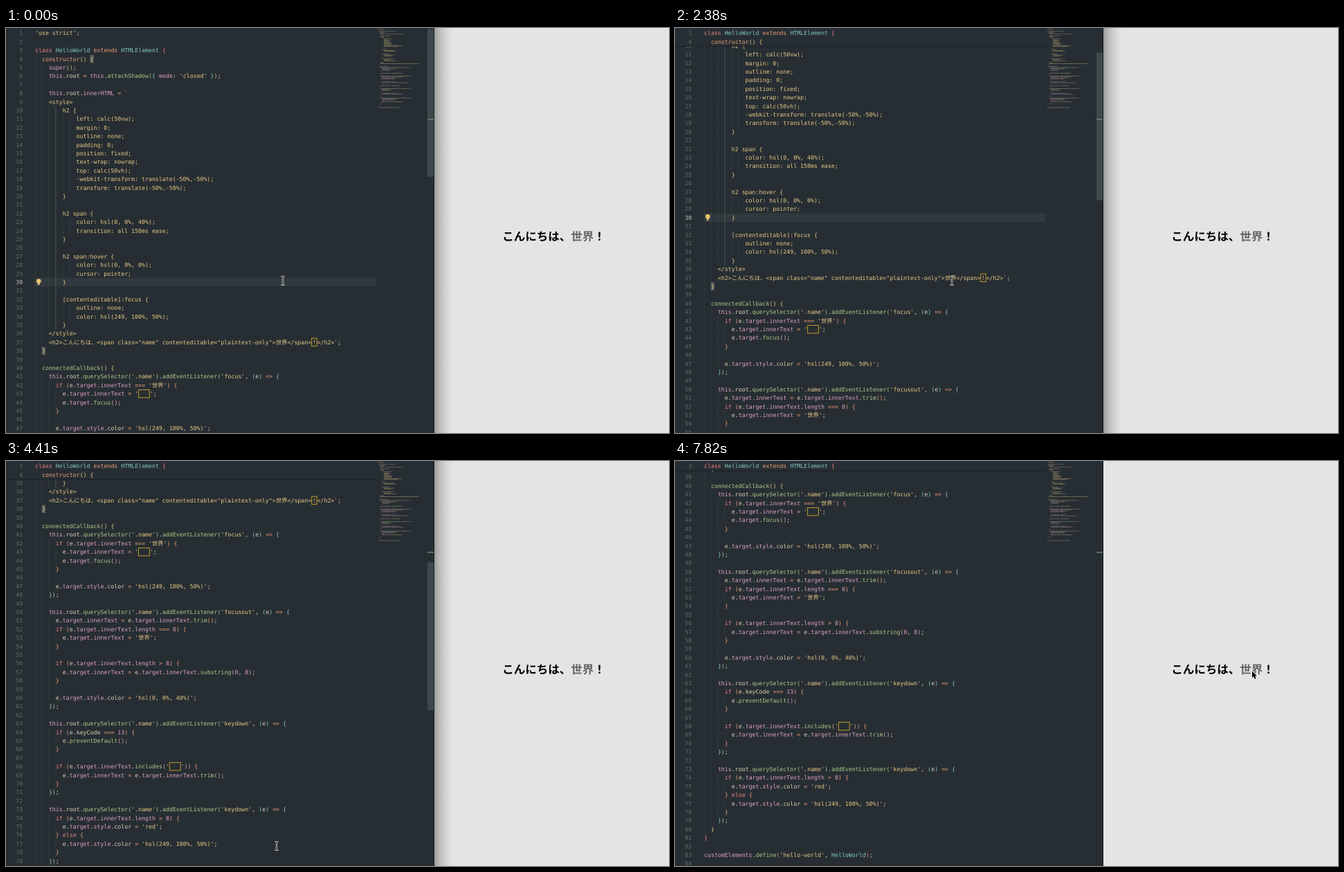
Write an HTML page with a canvas that moves like this. It is 958 px wide and 585 px high and loops after 8000 ms.

```html
<!DOCTYPE html>
<html lang="ja">
<head>
<meta charset="utf-8">
<style>
html, body { margin: 0; width: 100%; height: 100%; overflow: hidden; background: #e4e4e4; }
canvas { display: block; }
</style>
</head>
<body>
<canvas id="stage" width="958" height="585"></canvas>
<script id="code" type="text/plain">'use strict';

class HelloWorld extends HTMLElement {
  constructor() {
    super();
    this.root = this.attachShadow({ mode: 'closed' });

    this.root.innerHTML = `
    <style>
        h2 {
            left: calc(50vw);
            margin: 0;
            outline: none;
            padding: 0;
            position: fixed;
            text-wrap: nowrap;
            top: calc(50vh);
            -webkit-transform: translate(-50%,-50%);
            transform: translate(-50%,-50%);
        }

        h2 span {
            color: hsl(0, 0%, 40%);
            transition: all 150ms ease;
        }

        h2 span:hover {
            color: hsl(0, 0%, 0%);
            cursor: pointer;
        }

        [contenteditable]:focus {
            outline: none;
            color: hsl(249, 100%, 50%);
        }
    </style>
    <h2>こんにちは、<span class="name" contenteditable="plaintext-only">世界</span>！</h2>`;
  }

  connectedCallback() {
    this.root.querySelector('.name').addEventListener('focus', (e) => {
      if (e.target.innerText === '世界') {
        e.target.innerText = '  ';
        e.target.focus();
      }

      e.target.style.color = 'hsl(249, 100%, 50%)';
    });

    this.root.querySelector('.name').addEventListener('focusout', (e) => {
      e.target.innerText = e.target.innerText.trim();
      if (e.target.innerText.length === 0) {
        e.target.innerText = '世界';
      }

      if (e.target.innerText.length > 8) {
        e.target.innerText = e.target.innerText.substring(0, 8);
      }

      e.target.style.color = 'hsl(0, 0%, 40%)';
    });

    this.root.querySelector('.name').addEventListener('keydown', (e) => {
      if (e.keyCode === 13) {
        e.preventDefault();
      }

      if (e.target.innerText.includes('  ')) {
        e.target.innerText = e.target.innerText.trim();
      }
    });

    this.root.querySelector('.name').addEventListener('keydown', (e) => {
      if (e.target.innerText.length > 8) {
        e.target.style.color = 'red';
      } else {
        e.target.style.color = 'hsl(249, 100%, 50%)';
      }
    });
  }
}

customElements.define('hello-world', HelloWorld);
</script>
<script>
const ctx = document.getElementById('stage').getContext('2d');
// put the ideographic spaces in, whatever the file's whitespace became
const source = document.getElementById('code').textContent.replace(/'\s\s'/g, "'\u3000\u3000'");

const LOOP = 8000, BLUR = 7760, W = 958, H = 585;
const TOP = 1.3, LEFT = 42, LINE = 12.4, CHAR = 4.973, WIDE = 8.26, EDGE = 619, TEXT_END = 535;
const BG = '#272e33', FG = '#dcd0b6', RED = '#ee8385', ORANGE = '#ee9d78', YELLOW = '#e6c886',
      GREEN = '#aeca88', BLUE = '#82cabf', PURPLE = '#dfa0be';
const BRACKETS = [RED, YELLOW, GREEN, BLUE, ORANGE, PURPLE];
const FONT = '8.26px "DejaVu Sans Mono", "Noto Sans CJK JP", monospace';
const WORDS = {};
const paint = (color, words) => words.split(' ').forEach(w => WORDS[w] = color);
paint(RED, 'class if else');
paint(ORANGE, 'extends constructor');
paint(BLUE, 'HelloWorld HTMLElement');
paint(PURPLE, 'this super mode target innerText innerHTML length style customElements');

// Split the code into coloured runs, line by line
const lines = source.split('\n').map(text => ({ text, runs: [], boxes: [] }));
let row = 0, x = 0, depth = 0;

function addRun(text, color) {
  for (const [part] of text.matchAll(/[\x20-\x7e]+|[^\x00-\x7f]+/g)) {
    const wide = part > '\x7f', w = part.length * (wide ? WIDE : CHAR);
    if (part.trim()) lines[row].runs.push({ part, x, w, color });
    if (/[\u3000！]/.test(part)) lines[row].boxes.push([x, w]);
    x += w;
  }
}

for (const m of source.matchAll(/`[^`]*`|'[^']*'|[A-Za-z]\w*|\d+|\s+|=>|===|./g)) {
  const s = m[0];
  let color = FG;
  if (/^[`']/.test(s)) color = YELLOW;
  else if (/^[({]$/.test(s)) color = BRACKETS[depth++ % 6];
  else if (/^[)}]$/.test(s)) color = BRACKETS[--depth % 6];
  else if (/^[=>]/.test(s)) color = ORANGE;
  else if (/^\d/.test(s)) color = PURPLE;
  else if (/^\w/.test(s)) color = WORDS[s] || (source[m.index + s.length] === '(' ? GREEN : FG);
  s.split('\n').forEach((part, i) => {
    if (i) { row++; x = 0; }
    addRun(part, color);
  });
}

// Indent levels; a blank line takes its level from its neighbours
const indent = l => l.text.search(/\S/) / 2;
lines.forEach((l, i) => {
  if (l.text.trim()) { l.level = indent(l); return; }
  const above = i ? lines[i - 1].level : 0;
  const next = lines.slice(i).find(n => n.text.trim());
  const below = next ? indent(next) : 0;
  l.level = above === below ? above : Math.min(above, below) + 1;
});

// Monotone cubic through [time, value] points
function curve(...pts) {
  const n = pts.length - 1;
  const d = pts.slice(1).map((p, i) => (p[1] - pts[i][1]) / (p[0] - pts[i][0]));
  const slope = pts.map((p, i) => i && i < n && d[i - 1] * d[i] > 0 ? 2 * d[i - 1] * d[i] / (d[i - 1] + d[i]) : 0);
  return t => {
    if (t <= pts[0][0]) return pts[0][1];
    if (t >= pts[n][0]) return pts[n][1];
    const i = pts.findIndex(p => p[0] > t) - 1, h = pts[i + 1][0] - pts[i][0], u = (t - pts[i][0]) / h, v = 1 - u;
    return v * v * ((1 + 2 * u) * pts[i][1] + u * h * slope[i]) +
           u * u * ((1 + 2 * v) * pts[i + 1][1] - v * h * slope[i + 1]);
  };
}
const scrollAt = curve([1350, 0], [1800, 37.2], [2380, 93], [3000, 170], [3240, 188.7],
                       [3900, 188.7], [4100, 240], [4410, 396.7], [4640, 453], [4880, 455.2]);
const mouseX = curve([3370, 400], [3710, 391], [6030, 391], [6080, 394.5], [6830, 873], [7070, 873], [7580, 833.5]);
const mouseY = curve([3370, 365], [3710, 556], [6080, 556], [6830, 343], [7070, 343], [7580, 303]);

function rect(color, x, y, w, h) {
  ctx.fillStyle = color;
  ctx.fillRect(x, y, w, h);
}

function drawText(i, y) {
  ctx.font = FONT;
  ctx.textAlign = 'right';
  ctx.fillStyle = i === 29 ? '#c3c9bf' : '#606a69';
  ctx.fillText(i + 1, 24.3, y + 9.1);
  ctx.textAlign = 'left';
  for (const r of lines[i].runs) {
    ctx.fillStyle = r.color;
    ctx.fillText(r.part, LEFT + r.x, y + 9.1);
  }
}

function drawLine(i, y, t) {
  const l = lines[i];
  if (i === 29) rect('#30393d', LEFT, y, TEXT_END - LEFT, LINE);
  for (let k = 0; k < l.level; k++) {
    const active = k === 3 && i > 8 && i < 35;
    rect(`rgba(140,155,148,${active ? 0.42 : 0.16})`, LEFT + k * 2 * CHAR - 0.3, y, 0.8, LINE);
  }
  if (t < BLUR && (i === 3 || i === 37)) {
    rect('#545c5d', LEFT + (i === 3 ? 16 : 2) * CHAR - 0.4, y + 0.4, CHAR + 0.6, LINE - 0.8);
  }
  drawText(i, y);
  ctx.strokeStyle = '#bd9b2c';
  ctx.lineWidth = 1;
  for (const [bx, w] of l.boxes) ctx.strokeRect(LEFT + bx + 0.4, y + 0.5, w - 0.8, LINE - 1);
  if (i === 29) {
    drawBulb(47.3, y + 4.6);
    if (t >= 560 && (t - 560) % 1010 < 490) rect('#dbd68c', 86.2, y, 1.3, LINE);
  }
}

function drawBulb(x, y) {
  ctx.fillStyle = '#e8c46c';
  ctx.beginPath();
  ctx.arc(x, y, 3.3, 0, 7);
  ctx.fill();
  rect('#e8c46c', x - 1.6, y + 2, 3.2, 2.2);
  rect('#b5bbb5', x - 1.5, y + 4.2, 3, 1.6);
}

function drawSticky(scroll) {
  if (scroll <= 2 * LINE) return;
  // the method header is pushed out by the end of its body
  const bodyEnd = 37 * LINE - scroll;
  const both = bodyEnd >= LINE;
  const second = Math.min(LINE, bodyEnd - LINE);
  const bottom = TOP + (both ? second + LINE : LINE);
  rect(BG, 0, 0, TEXT_END, bottom);
  if (both) drawText(3, TOP + second);
  rect(BG, 0, 0, TEXT_END, TOP + (both ? second : LINE));
  drawText(2, TOP);
  rect('rgba(0,0,0,.28)', 0, bottom, TEXT_END, 0.8);
  rect('rgba(0,0,0,.1)', 0, bottom + 0.8, TEXT_END, 1.2);
}

function drawMinimap() {
  ctx.globalAlpha = 0.42;
  lines.forEach((l, i) => {
    for (const r of l.runs) {
      const lead = r.part.length - r.part.trimStart().length;
      rect(r.color, 538 + (r.x + lead * CHAR) * 0.133, 1.5 + i * 1.378, (r.w - lead * CHAR) * 0.133, 0.85);
    }
  });
  ctx.globalAlpha = 1;
}

function drawPage(fade) {
  rect('#e4e4e4', EDGE, 0, W - EDGE, H);
  const g = ctx.createLinearGradient(EDGE, 0, EDGE + 27, 0);
  [0.32, 0.19, 0.1, 0.04, 0].forEach((a, i) => g.addColorStop(i / 4, `rgba(0,0,0,${a * fade})`));
  rect(g, EDGE, 0, 27, H);
  ctx.font = 'bold 16.5px "Noto Sans CJK JP", sans-serif';
  const word = (s, x, color) => { ctx.fillStyle = color; ctx.fillText(s, x, 307.4); };
  word('こんにちは、', 717.3, '#000');
  word('世界', 816.3, '#666');
  word('！', 849.3, '#000');
}

function drawBeam(x, y) {
  ctx.beginPath();
  for (const s of [-1, 1]) {
    ctx.moveTo(x - 2.6, y + s * 6);
    ctx.quadraticCurveTo(x, y + s * 6, x, y + s * 4);
    ctx.quadraticCurveTo(x, y + s * 6, x + 2.6, y + s * 6);
  }
  ctx.moveTo(x, y - 4.5);
  ctx.lineTo(x, y + 4.5);
  ctx.moveTo(x - 1.6, y + 2);
  ctx.lineTo(x + 1.6, y + 2);
  for (const [color, w] of [['#e8e8e8', 2.2], ['#15191b', 0.9]]) {
    ctx.strokeStyle = color;
    ctx.lineWidth = w;
    ctx.stroke();
  }
}

function drawArrow(x, y) {
  const p = new Path2D('M0 0V9.8L2.3 7.8L3.9 11.6L5.7 10.8L4.1 7.1H7.1Z');
  ctx.save();
  ctx.translate(x + 0.4, y + 0.4);
  ctx.strokeStyle = '#fff';
  ctx.lineWidth = 1.4;
  ctx.stroke(p);
  ctx.fillStyle = '#000';
  ctx.fill(p);
  ctx.restore();
}

function draw(t) {
  const scroll = scrollAt(t);
  const fade = t < BLUR ? 1 : t < 7820 ? 0.5 : 0;
  ctx.textRendering = 'geometricPrecision';
  rect(BG, 0, 0, EDGE, H);
  for (let i = 0; i < 84; i++) {
    const y = TOP + i * LINE - scroll;
    if (y > -LINE && y < H) drawLine(i, y, t);
  }
  drawSticky(scroll);
  drawMinimap();
  rect(`rgba(150,165,165,${0.22 * fade})`, 609, TOP + scroll * 0.3655, 9, 213.5);
  rect('#78867c', 609, 131.2, 9, 1.4);
  rect('#171c1f', 618, 0, 1, H);
  drawPage(fade);
  const mx = mouseX(t), my = mouseY(t);
  (mx < EDGE ? drawBeam : drawArrow)(mx, my);
}

function tick() {
  draw(performance.now() % LOOP);
  requestAnimationFrame(tick);
}
tick();
</script>
</body>
</html>
```
